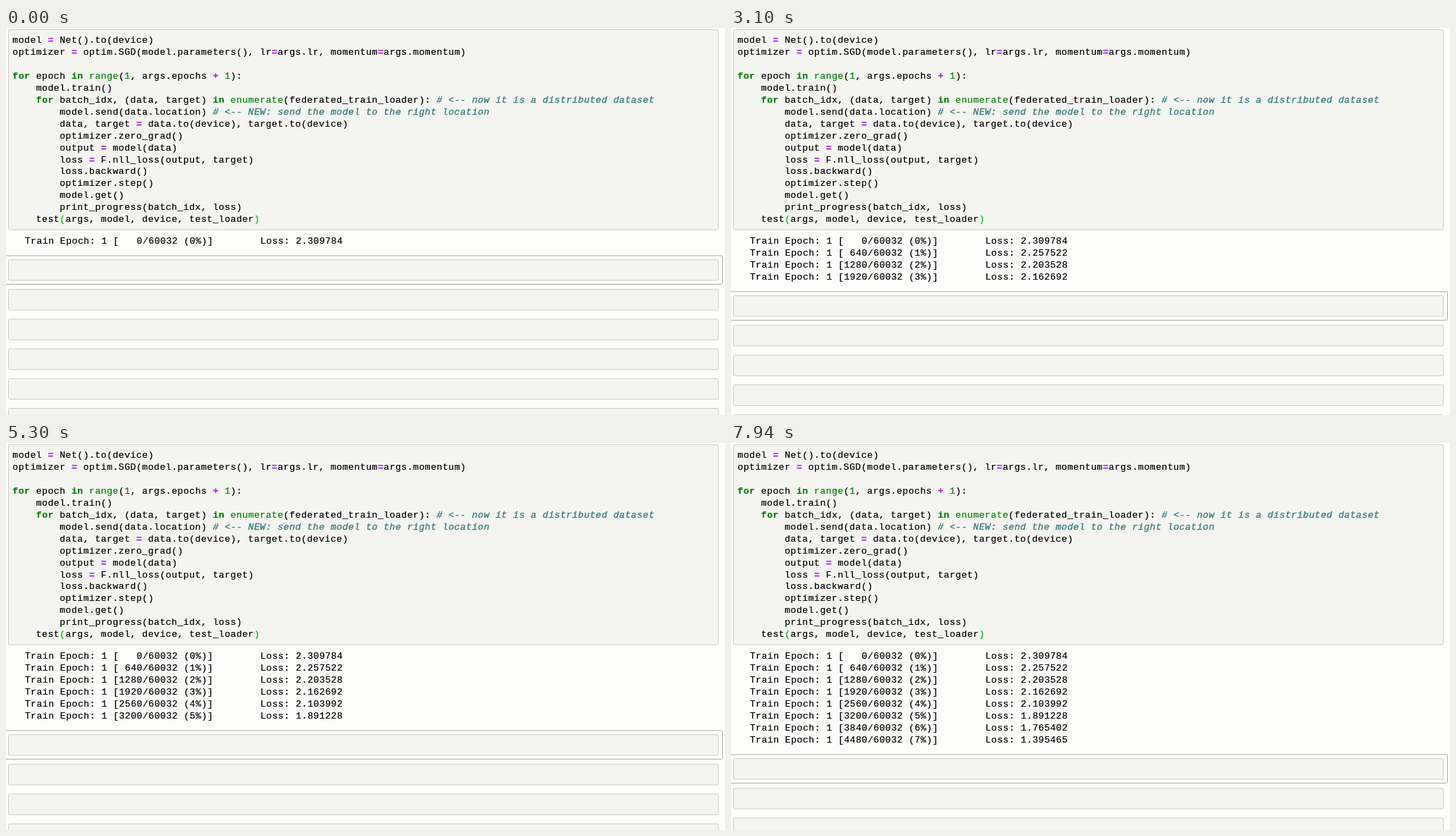
Recreate the animation shown at these times as an HTML page. Size 1021 by 549 pixels, loop 8 s.

```html
<!DOCTYPE html>
<html lang="en">
<head>
<meta charset="utf-8">
<title>Training log</title>
<style>
html, body { margin: 0; width: 100%; height: 100%; overflow: hidden; background: #fdfdfb; }
svg { display: block; width: 1021px; height: 549px; }
rect { fill: #f4f4f1; stroke: #cbcbc8; }
.active { fill: none; stroke: #ababab; }
text {
  font: 13.2px "Liberation Mono", "Courier New", monospace;
  letter-spacing: .45px;
  white-space: pre;
  color: #000;
  fill: currentColor;
  stroke: currentColor;
  stroke-width: .2px;
}
.keyword, .operator { font-weight: bold; }
.keyword, .builtin, .number { color: #008000; }
.operator { color: #a2f; }
.comment { color: #408080; font-style: italic; stroke-width: .4px; }
.bracket { color: #0b0; }
</style>
</head>
<body>
<svg viewBox="0 0 1021 549" xml:space="preserve"><g id="code"></g><g id="log"></g><g id="cells"></g></svg>
<script>
const source = `model = Net().to(device)
optimizer = optim.SGD(model.parameters(), lr=args.lr, momentum=args.momentum)

for epoch in range(1, args.epochs + 1):
    model.train()
    for batch_idx, (data, target) in enumerate(federated_train_loader): # <-- now it is a distributed dataset
        model.send(data.location) # <-- NEW: send the model to the right location
        data, target = data.to(device), target.to(device)
        optimizer.zero_grad()
        output = model(data)
        loss = F.nll_loss(output, target)
        loss.backward()
        optimizer.step()
        model.get()
        print_progress(batch_idx, loss)
    test(args, model, device, test_loader)`;
const losses = ["2.309784", "2.257522", "2.203528", "2.162692",
                "2.103992", "1.891228", "1.765402", "1.395465"];
const LOOP = 8000, FIRST = 1050, STEP = 1000, LINE = 17;

const token = /(?<comment>#.*)|(?<keyword>\b(?:for|in)\b)|(?<builtin>\b(?:range|enumerate)\b)|(?<number>\b\d+\b)|(?<operator>[=+])|(?<bracket>(?<=test)\(|(?<=test_loader)\)$)/g;

function highlight(line) {
  return line.replace(/</g, "&lt;").replace(token, (match, ...rest) => {
    const groups = rest.pop();
    const kind = Object.keys(groups).find(k => groups[k] !== undefined);
    return `<tspan class="${kind}">${match}</tspan>`;
  });
}

const text = (x, y, content) => `<text x="${x}" y="${y}">${content}</text>`;
const box = (x, y, w, h, kind = "") =>
  `<rect class="${kind}" x="${x}" y="${y}" width="${w}" height="${h}" rx="2"/>`;
const part = id => document.getElementById(id);

part("code").innerHTML = box(3.5, 2.5, 1008, 283.7) +
  source.split("\n").map((line, i) => text(9.3, 20.8 + i * 16.97, highlight(line))).join("");

part("log").innerHTML = losses.map((loss, i) => {
  const count = String(i * 640).padStart(4);
  return text(26.7, 306 + i * LINE,
    `Train Epoch: 1 [${count}/60032 (${i}%)]        Loss: ${loss}`);
}).join("");

// The selected cell, then the empty cells below it
part("cells").innerHTML = box(-5.5, 323, 1023, 40.5, "active") + box(3.5, 328.7, 1008, 29.3) +
  [0, 1, 2, 3, 4].map(i => box(3.5, 370.8 + i * 42.2, 1008, 29.3)).join("");

const rows = [...part("log").children];

function draw(now) {
  const t = now % LOOP;
  const added = Math.max(0, Math.floor((t - FIRST) / STEP) + 1);
  rows.forEach((row, i) => row.setAttribute("visibility", i <= added ? "visible" : "hidden"));
  part("cells").setAttribute("transform", `translate(0 ${added * LINE})`);
}

const start = performance.now();
function tick() {
  draw(performance.now() - start);
  requestAnimationFrame(tick);
}
tick();
</script>
</body>
</html>
```
